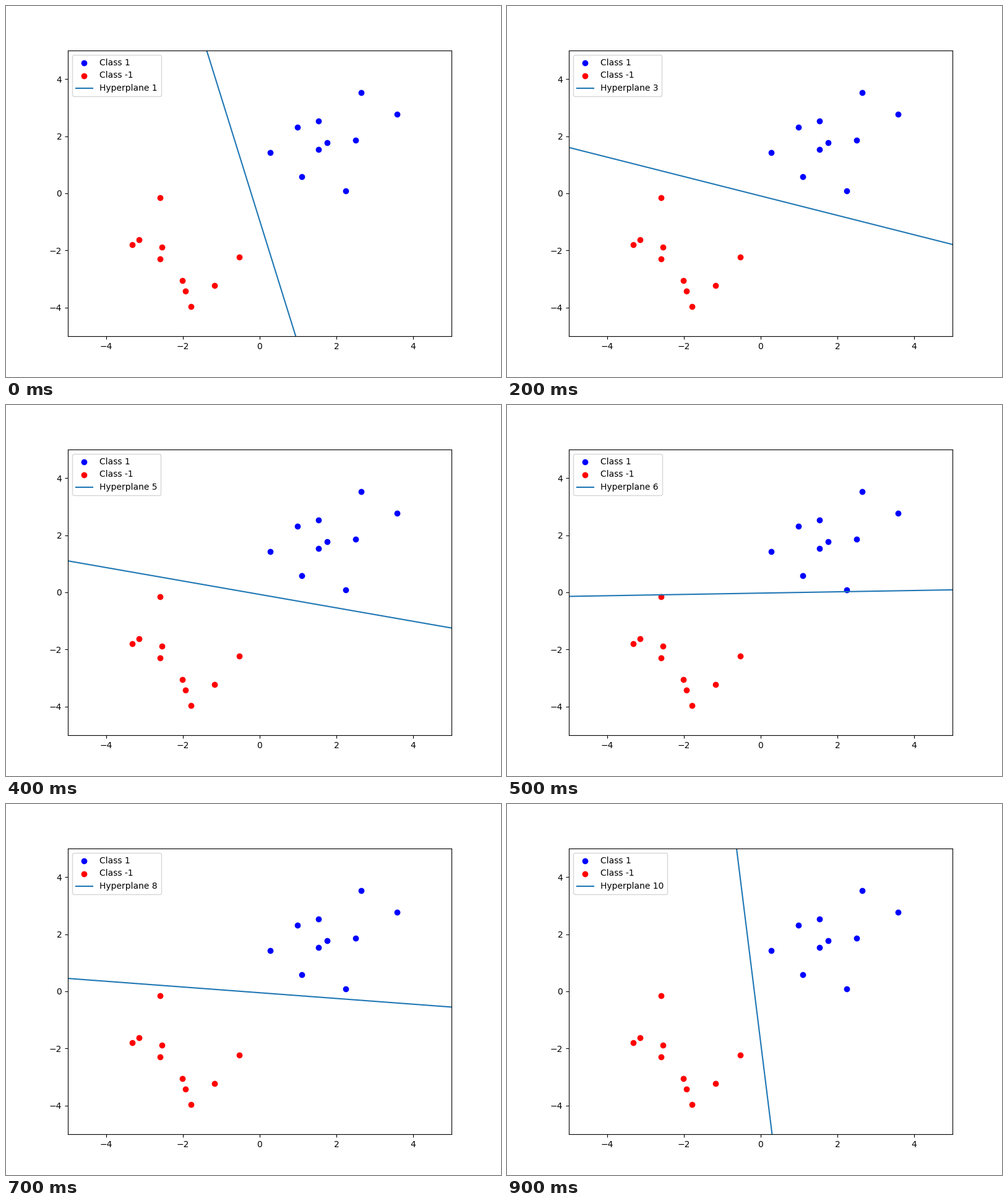
Write a matplotlib script that moves like this. It is 800x600 px and loops after 1 s.

```python
import matplotlib.pyplot as plt
import numpy as np
from matplotlib.animation import FuncAnimation

PLANES = 10
LIMIT = 5

rng = np.random.RandomState(42)
positives = rng.randn(10, 2) + 2
negatives = rng.randn(10, 2) - 2


def separating_planes(count):
    """Draw random normals, keep those that split the classes, centre the offset."""
    planes = []
    while len(planes) < count:
        normal = rng.randn(2)
        low = (positives @ normal).min()
        high = (negatives @ normal).max()
        if low > high:
            planes.append((normal, (low + high) / 2))
    return planes


planes = separating_planes(PLANES)
xs = np.linspace(-LIMIT, LIMIT, 100)

plt.rcParams["font.family"] = "DejaVu Sans"
fig, ax = plt.subplots(figsize=(8, 6), dpi=100)


def update(frame):
    ax.clear()
    (wx, wy), offset = planes[frame]
    ax.scatter(*positives.T, color="blue", label="Class 1")
    ax.scatter(*negatives.T, color="red", label="Class -1")
    ax.plot(xs, (offset - wx * xs) / wy, label=f"Hyperplane {frame + 1}")
    ax.set_xlim(-LIMIT, LIMIT)
    ax.set_ylim(-LIMIT, LIMIT)
    ax.legend()


anim = FuncAnimation(fig, update, frames=PLANES, interval=100, repeat=True)
plt.show()
```
